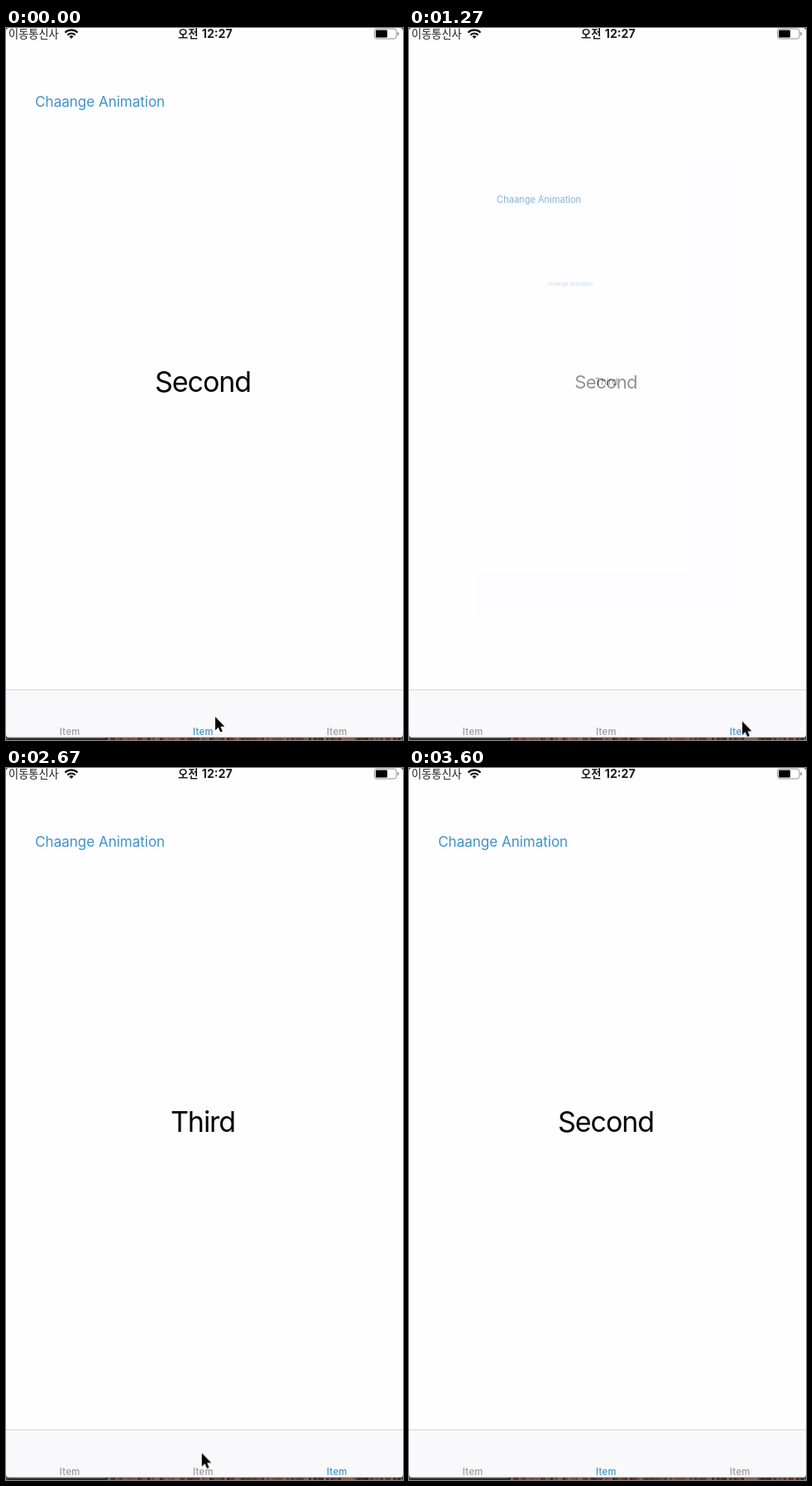
These frames come from a looping animation (480 px wide and 859 px high, 3.74 s). An HTML page:

```html
<!DOCTYPE html>
<html lang="ko">
<head>
<meta charset="utf-8">
<title>Tab transition</title>
<style>
  html, body { margin: 0; width: 100%; height: 100%; overflow: hidden; background: #fefdff; }
  svg { display: block; width: 480px; height: 859px; }
  text { font-family: Inter, Roboto, sans-serif; font-optical-sizing: none; }
  .ko { font-family: "Noto Sans CJK KR", "Noto Sans CJK", "Noto Sans CJK JP", sans-serif; }
  .status { fill: #1d1c1e; }
  .page { fill: #fefdff; }
  .button { font-size: 17px; fill: #3d93c8; }
  .title { font-size: 34px; letter-spacing: -1.05px; text-anchor: middle; fill: #050406; }
  .tab { font-size: 11.2px; font-weight: 500; letter-spacing: .35px; text-anchor: middle; fill: #98979a; }

  /* Paused; the script moves --t in steps of a fifteenth of a second. */
  .view, .tab, .cursor {
    animation: 3740ms linear infinite paused;
    animation-delay: calc(var(--t, 0) * -1ms);
  }
  .view { transform-origin: 238.4px 427.2px; animation-timing-function: ease-in-out; }
  #leaving { animation-name: leave; }
  #third { animation-name: visit; }
  #returning { animation-name: enter; }
  .tab { animation-timing-function: step-end; }
  #tab2 { animation-name: tab2; }
  #tab3 { animation-name: tab3; }
  .cursor { animation-name: point; }

  @keyframes leave {
    0%, 29.037% { transform: scale(1); opacity: 1; }
    40.802%, 100% { transform: scale(0); opacity: 0; }
  }
  @keyframes visit {
    0%, 29.037% { transform: scale(0); opacity: 0; }
    40.802%, 73.77% { transform: scale(1); opacity: 1; }
    85.535%, 100% { transform: scale(0); opacity: 0; }
  }
  @keyframes enter {
    0%, 73.77% { transform: scale(0); opacity: 0; }
    85.535%, 100% { transform: scale(1); opacity: 1; }
  }
  @keyframes tab2 {
    0%, 72.9%, 100% { fill: #3d93c8; }
    28.4% { fill: #98979a; }
  }
  @keyframes tab3 {
    0%, 72.9%, 100% { fill: #98979a; }
    28.4% { fill: #3d93c8; }
  }
  @keyframes point {
    0% { transform: translate(253px, 831px); animation-timing-function: ease-in-out; }
    14.1% { transform: translate(420.5px, 840.5px); animation-timing-function: ease-in-out; }
    21.3%, 51.7% { transform: translate(403px, 836.5px); animation-timing-function: ease-out; }
    58.8% { transform: translate(255.5px, 827px); animation-timing-function: ease-out; }
    62.2%, 87% { transform: translate(236.7px, 826.5px); animation-timing-function: ease-in; }
    94.3% { transform: translate(239px, 853px); }
    96.1%, 100% { transform: translate(242px, 864px); }
  }
</style>
</head>
<body>
<svg viewBox="0 0 480 859">
  <defs>
    <g id="base">
      <rect class="page" width="480" height="859"/>
      <text class="button" x="35.2" y="95.2">Chaange Animation</text>
    </g>
    <g id="second">
      <use href="#base"/>
      <text class="title" x="238" y="439.3">Second</text>
    </g>
  </defs>

  <!-- Each arriving page lies above the one it replaces -->
  <g class="view" id="leaving"><use href="#second"/></g>
  <g class="view" id="third">
    <use href="#base"/>
    <text class="title" x="238" y="439.3">Third</text>
  </g>
  <g class="view" id="returning"><use href="#second"/></g>

  <g class="status">
    <text class="ko" x="3" y="12" font-size="13.2">이동통신사</text>
    <g fill="none" stroke="#0b0a0c" stroke-width="2.1">
      <path d="M71.5 5.4A10.8 10.8 0 0 1 86.5 5.4"/>
      <path d="M74.3 8.4A6.7 6.7 0 0 1 83.7 8.4"/>
    </g>
    <path d="M76.4 10.3A3.7 3.7 0 0 1 81.6 10.3L79 13Z"/>
    <text class="ko" x="208" y="12" font-size="13.2" font-weight="600">오전</text>
    <text x="273.8" y="12" font-size="14.2" font-weight="650" text-anchor="end">12:27</text>
    <rect x="445.5" y="1" width="26.5" height="12" rx="2.8" fill="none" stroke="#929194"/>
    <rect x="447" y="2.5" width="14" height="9" rx="1.2" fill="#030204"/>
    <path d="M473.3 4.8Q475.2 5.2 475.2 7T473.3 9.2Z" fill="#929194"/>
  </g>

  <rect y="798" width="480" height="58" fill="#f9f8fa"/>
  <rect y="798" width="480" height="1" fill="#d6d5d8"/>
  <text class="tab" x="77.2" y="853">Item</text>
  <text class="tab" id="tab2" x="238.4" y="853">Item</text>
  <text class="tab" id="tab3" x="400.2" y="853">Item</text>

  <rect y="855.5" width="480" height="1" fill="#aaa6a8"/>
  <g id="edge"><rect y="856.4" width="480" height="3" fill="#2d2a2e"/></g>
  <path d="M0 0H4Q0 0 0 4ZM480 0H476Q480 0 480 4ZM0 859V852Q0 856.5 5 856.5ZM480 859V852Q480 856.5 475 856.5Z" fill="#4b494c"/>

  <path class="cursor" d="M0 0V16.2L3.7 12.8 6.2 18.6 8.8 17.5 6.3 11.8H11.4Z"
        fill="#050505" stroke="#fff" stroke-width="1.1" paint-order="stroke" stroke-linejoin="round"/>
</svg>
<script>
  const LOOP = 3740, STEP = 200 / 3;

  // Sliver of mottled desktop below the window
  let seed = 7;
  const random = () => (seed = (seed * 16807) % 2147483647) / 2147483647;
  const edge = document.getElementById('edge');
  for (let x = 120; x < 480; x += 3) {
    const rect = document.createElementNS('http://www.w3.org/2000/svg', 'rect');
    const attrs = { x, y: 856.4, width: 3, height: 3, fill: `hsl(16 36% ${16 + random() * 30}%)` };
    for (const key in attrs) rect.setAttribute(key, attrs[key]);
    edge.append(rect);
  }

  const start = performance.now();
  function draw() {
    const time = (performance.now() - start) % LOOP;
    const held = Math.floor((time + 5) / STEP) * STEP;
    document.documentElement.style.setProperty('--t', Math.min(held, LOOP - 1).toFixed(2));
    requestAnimationFrame(draw);
  }
  draw();
</script>
</body>
</html>
```
